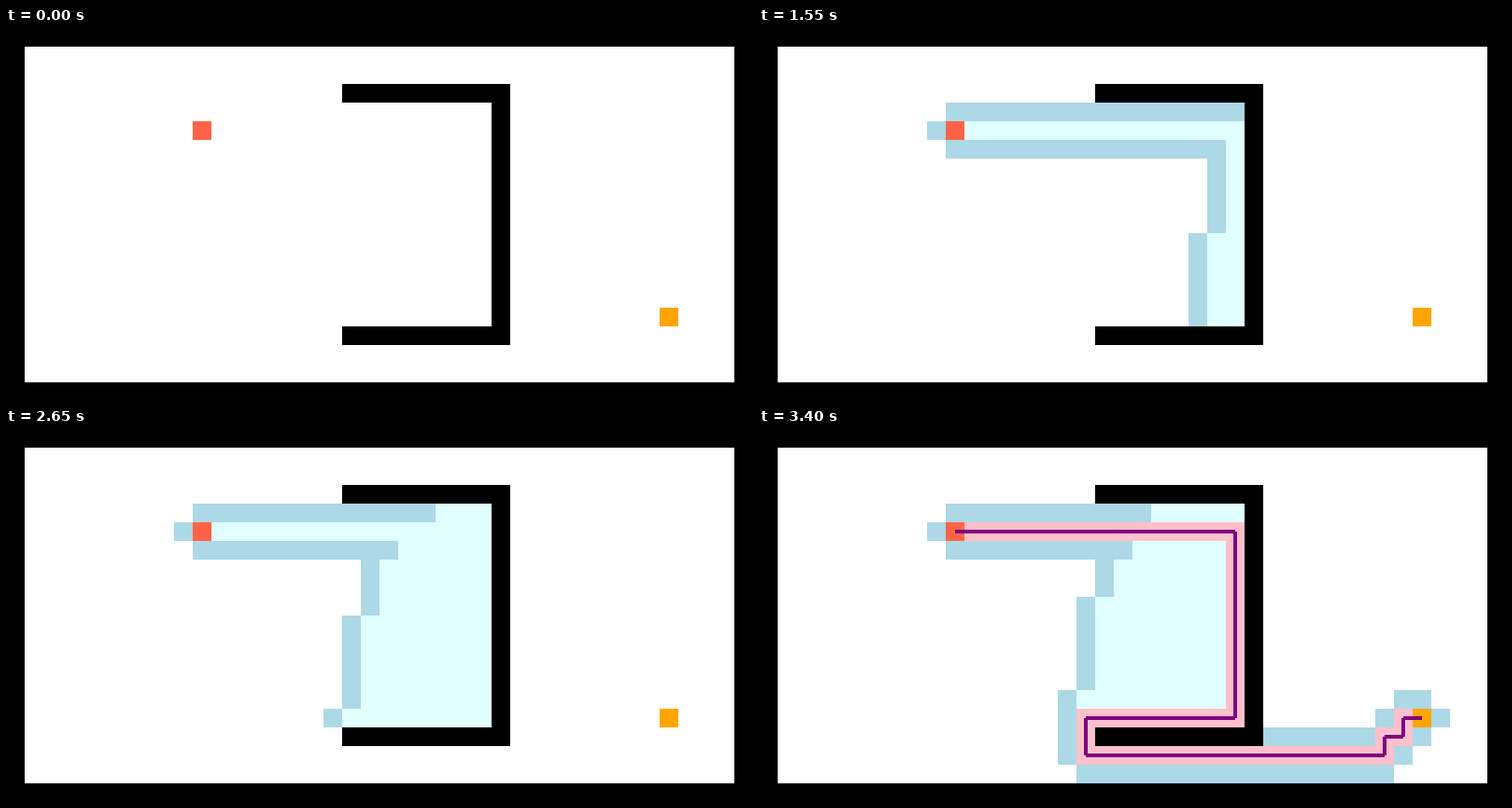
Recreate the animation shown at these times as an HTML page with a canvas. Size 800 by 400 pixels, loop 4600 ms.

```html
<!DOCTYPE html>
<html lang="en">
<head>
<meta charset="utf-8">
<title>Greedy best-first search</title>
<style>
html, body { margin: 0; overflow: hidden; }
canvas { display: block; }
</style>
</head>
<body>
<canvas width="800" height="400"></canvas>
<script>
const ctx = document.querySelector('canvas').getContext('2d');
const SIZE = 20, COLS = 40, ROWS = 20, LOOP = 4600;
const start = { x: 10, y: 5 }, goal = { x: 35, y: 15 };

function isWall(x, y) {
  const border = x === 0 || y === 0 || x === COLS - 1 || y === ROWS - 1;
  const bars = (y === 3 || y === 16) && x >= 18 && x <= 26;
  return border || bars || (x === 26 && y >= 3 && y <= 16);
}

const dist = c => Math.hypot(c.x - goal.x, c.y - goal.y);

// Returns every reached cell with the steps at which it was opened and closed.
function search() {
  const cells = [], seen = new Set(), open = [];
  const add = (x, y, parent, step) => {
    const key = y * COLS + x;
    if (isWall(x, y) || seen.has(key)) return;
    seen.add(key);
    const cell = { x, y, parent, opened: step, closed: Infinity };
    cells.push(cell);
    open.push(cell);
  };
  add(start.x, start.y, null, 1);
  for (let step = 1; open.length; step++) {
    // On equal distance the newest cell wins.
    let best = 0;
    open.forEach((c, i) => { if (dist(c) <= dist(open[best])) best = i; });
    const [cell] = open.splice(best, 1);
    cell.closed = step;
    const { x, y } = cell;
    add(x + 1, y, cell, step);
    add(x, y + 1, cell, step);
    add(x - 1, y, cell, step);
    add(x, y - 1, cell, step);
    if (dist(cell) === 0) return { cells, end: cell, steps: step };
  }
}

const { cells, end, steps } = search();
const path = [];
for (let c = end; c; c = c.parent) path.push(c);

function fill(c, color) {
  ctx.fillStyle = color;
  ctx.fillRect(c.x * SIZE, c.y * SIZE, SIZE, SIZE);
}

function stepsAt(t) {
  if (t < 1000) return 0;
  const tick = Math.floor((t - 1000) / 50) + 1;
  return Math.floor(Math.max(2.5 * tick, 2.4 * tick + 2.3));
}

function drawLine() {
  ctx.strokeStyle = 'purple';
  ctx.lineWidth = 4;
  const mid = v => (v + 0.5) * SIZE;
  for (const c of path) {
    if (!c.parent) continue;
    ctx.beginPath();
    ctx.moveTo(mid(c.x), mid(c.y));
    ctx.lineTo(mid(c.parent.x), mid(c.parent.y));
    ctx.stroke();
  }
}

function draw(now) {
  const n = stepsAt(now % LOOP), done = n >= steps;
  ctx.fillStyle = 'white';
  ctx.fillRect(0, 0, 800, 400);
  for (let y = 0; y < ROWS; y++)
    for (let x = 0; x < COLS; x++)
      if (isWall(x, y)) fill({ x, y }, 'black');
  for (const c of cells)
    if (c.opened <= n) fill(c, c.closed <= n ? 'lightcyan' : 'lightblue');
  if (done) path.forEach(c => fill(c, 'pink'));
  fill(start, 'tomato');
  fill(goal, 'orange');
  if (done) drawLine();
}

const t0 = performance.now();
function frame() {
  draw(performance.now() - t0);
  requestAnimationFrame(frame);
}
frame();
</script>
</body>
</html>
```
